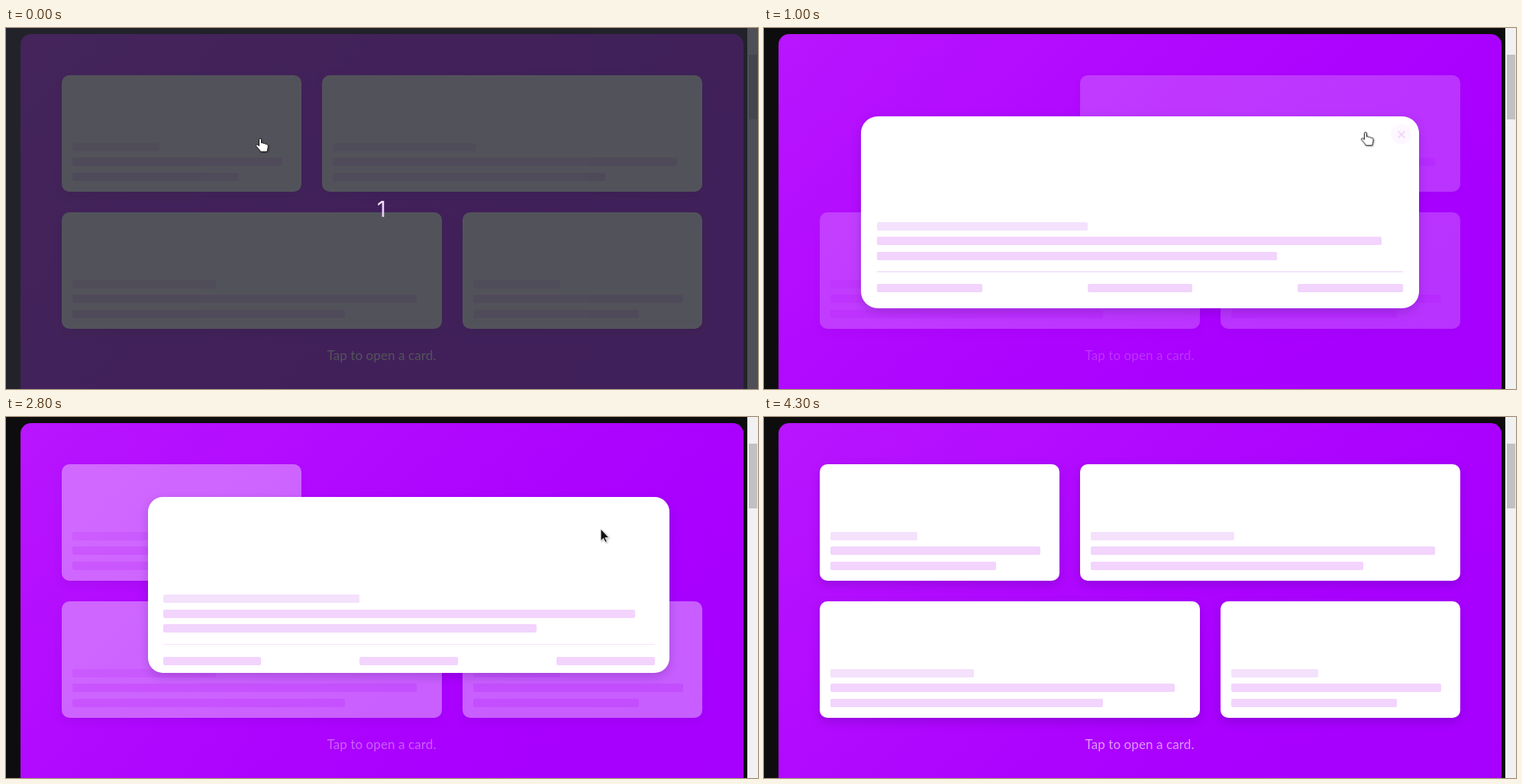
These frames come from a looping animation (985 by 474 pixels, 4500 ms). An HTML page:

```html
<!DOCTYPE html>
<html lang="en">
<head>
<meta charset="utf-8">
<title>Expanding cards</title>
<style>
  /* --p: how far a card is open; --dim-a, --dim-b: fade of the rest */
  @property --p { syntax: '<number>'; inherits: true; initial-value: 0; }
  @property --dim-a { syntax: '<number>'; inherits: true; initial-value: 0; }
  @property --dim-b { syntax: '<number>'; inherits: true; initial-value: 0; }

  html, body { margin: 0; width: 100%; height: 100%; overflow: hidden; background: #0d0d0d; }
  #stage {
    position: relative; width: 985px; height: 474px; overflow: hidden;
    animation: dim-a 4.5s linear infinite, dim-b 4.5s linear infinite;
  }
  #stage div, #stage svg { position: absolute; box-sizing: border-box; }

  .panel {
    left: 19px; top: 8px; width: 947px; height: 500px; border-radius: 14px;
    background: linear-gradient(135deg, #b915ff, #af06ff 42%, #a900ff 70%, #a600ff);
  }
  .track { left: 971px; top: 0; width: 14px; height: 474px; background: #f1f1f1; }
  .thumb { left: 2px; top: 35px; width: 11px; height: 85px; background: #c1c1c1; }

  .card {
    --rest: calc(1 - var(--p));
    left: calc(1px * (var(--x) * var(--rest) + 127 * var(--p)));
    top: calc(1px * (var(--y) * var(--rest) + 116 * var(--p)));
    width: calc(1px * (var(--w) * var(--rest) + 731 * var(--p)));
    height: calc(153px + 99px * var(--p));
    border-radius: 10px; overflow: hidden; background: #fff;
    box-shadow: 0 5px 13px rgba(40, 0, 80, .2);
    opacity: calc(1 - .8 * var(--dim-a) - .8 * var(--dim-b));
  }
  #a { --x: 73; --y: 62; --w: 314; opacity: calc(1 - .8 * var(--dim-b)); animation: open-a 4.5s infinite; }
  #b { --x: 414; --y: 62; --w: 498; opacity: calc(1 - .8 * var(--dim-a)); animation: open-b 4.5s infinite; z-index: 2; }
  #c { --x: 73; --y: 242; --w: 498; }
  #d { --x: 598; --y: 242; --w: 314; }

  .body {
    left: calc(14px + 7px * var(--p)); right: calc(14px + 7px * var(--p));
    top: calc(88.7px + 50px * var(--p)); height: 110px;
  }
  .bar { height: 11px; border-radius: 2px; background: #f2d4fd; }
  .title { width: 40%; background: #f4e1fc; }
  .line1 { width: 96%; top: 19.5px; }
  .line2 { width: 76%; top: 39px; }
  .rule {
    width: 100%; top: calc(64px + 2.5px * var(--rest));
    height: calc(.5px + 1.5px * var(--p)); background: #f4e4fc;
  }
  .tag { width: 20%; top: calc(81px + 4.5px * var(--rest)); }
  .tag:nth-of-type(6) { left: 40%; }
  .tag:nth-of-type(7) { left: 80%; }

  .close { right: 10px; top: 10px; width: 27px; height: 27px; opacity: 0; }
  #a .close { animation: close-a 4.5s linear infinite; }
  #b .close { animation: close-b 4.5s linear infinite; }

  .hint {
    left: 392px; top: 419px; width: 200px; line-height: 21px; text-align: center;
    font: 17px/21px Lato, sans-serif; letter-spacing: .1px; color: #fff;
    opacity: calc(1 - .8 * var(--dim-a) - .8 * var(--dim-b));
  }
  .hint span { animation: hint 4.5s step-end infinite; }

  .count {
    inset: 0; z-index: 5; background: rgba(39, 41, 49, .8);
    animation: count 4.5s step-end infinite;
  }
  .count div {
    left: 472px; top: 220px; width: 40px; text-align: center;
    font: 29px/35px Inter, sans-serif; color: transparent;
    background: linear-gradient(100deg, #fff 35%, #e6b4fb 65%);
    -webkit-background-clip: text; background-clip: text;
  }

  #cursor {
    left: 0; top: 0; width: 1px; height: 1px; overflow: visible; z-index: 6;
    filter: drop-shadow(1px 1px 1px rgba(0, 0, 0, .3));
    animation: move 4.5s linear infinite;
  }
  .hand { fill: #fff; stroke: #111; animation: hand 4.5s step-end infinite; }
  .arrow { fill: #111; stroke: #fff; stroke-width: .8; animation: arrow 4.5s step-end infinite; }

  @keyframes open-a {
    0%, 8.16% { --p: 0; border-radius: 10px; }
    21.49%, 39.24% { --p: 1; border-radius: 22px; }
    39.25% { border-radius: 10px; }
    52.58%, 100% { --p: 0; border-radius: 10px; }
    0%, 52.6% { z-index: 3; }
    55%, 100% { z-index: 1; }
  }
  @keyframes open-b {
    0%, 55.67% { --p: 0; border-radius: 10px; }
    69%, 80.67% { --p: 1; border-radius: 22px; }
    80.68% { border-radius: 10px; }
    94%, 100% { --p: 0; border-radius: 10px; }
  }
  @keyframes dim-a {
    0%, 10.49% { --dim-a: 0; }
    15.84%, 39.24% { --dim-a: 1; }
    43.58%, 100% { --dim-a: 0; }
  }
  @keyframes dim-b {
    0%, 58% { --dim-b: 0; }
    63.36%, 80.67% { --dim-b: 1; }
    85%, 100% { --dim-b: 0; }
  }
  @keyframes close-a {
    0%, 21.5% { opacity: 0; }
    26%, 39.24% { opacity: 1; }
    44.8%, 100% { opacity: 0; }
  }
  @keyframes close-b {
    0%, 69% { opacity: 0; }
    73.5%, 80.67% { opacity: 1; }
    86.2%, 100% { opacity: 0; }
  }
  @keyframes hint { 0% { opacity: 1; } 95.5%, 100% { opacity: .6; } }
  @keyframes count { 0% { visibility: visible; } 2.2%, 100% { visibility: hidden; } }
  @keyframes hand { 0% { opacity: 1; } 57%, 100% { opacity: 0; } }
  @keyframes arrow { 0% { opacity: 0; } 57% { opacity: 1; } 93.3%, 100% { opacity: 0; } }
  @keyframes move {
    0%, 8% { transform: translate(333px, 145px); }
    13.33% { transform: translate(558px, 137px); }
    20% { transform: translate(775px, 137px); }
    26.6% { transform: translate(813px, 136px); }
    33.3%, 39.2% { transform: translate(834px, 138px); }
    51%, 55% { transform: translate(786px, 145px); }
    62%, 69% { transform: translate(779px, 147px); }
    77.7% { transform: translate(745px, 80px); }
    82.2% { transform: translate(719px, 123px); }
    91%, 100% { transform: translate(640px, 5px); }
  }
</style>
</head>
<body>
<div id="stage">
  <div class="panel"></div>
  <div class="track"><div class="thumb"></div></div>
  <div class="card" id="a"></div>
  <div class="card" id="b"></div>
  <div class="card" id="c"></div>
  <div class="card" id="d"></div>
  <div class="hint"><span>Tap to open a card.</span></div>
  <div class="count"><div>1</div></div>
  <svg id="cursor">
    <path class="hand" d="M-1.5 9.8V1.7a1.5 1.5 0 0 1 3 0V6c1-.6 2.6-.2 3 .8 1-.5 2.3-.1 2.7.9 1.3-.5 3 .1 3 1.8V12c0 2-1.2 3.2-1.4 5.5H.5c-.6-2-2.5-3.5-5.4-7.1-1.4-2 .8-3.1 2-1.7z"/>
    <path class="arrow" d="M0 0V15.5L3.5 12.3 6 17.5 8.2 16.5 5.8 11.5H10.8Z"/>
  </svg>
</div>
<script>
  const LOOP = 4500, STEP = 100;
  const bars = ['bar title', 'bar line1', 'bar line2', 'rule', 'bar tag', 'bar tag', 'bar tag'];
  const content = `<div class="body">${bars.map(c => `<div class="${c}"></div>`).join('')}</div>
    <svg class="close" viewBox="0 0 27 27"><circle cx="13.5" cy="13.5" r="13.5" fill="#f2d4fb"/>
    <path d="M9.5 9.5l9 9m0-9l-9 9" stroke="#a808d0" stroke-width="2"/></svg>`;
  document.querySelectorAll('.card').forEach(card => card.innerHTML = content);

  // The picture advances ten times a second.
  const motions = document.getAnimations();
  motions.forEach(m => m.pause());
  const start = performance.now();
  function tick() {
    const t = Math.floor((performance.now() - start) % LOOP / STEP) * STEP;
    motions.forEach(m => m.currentTime = t);
    requestAnimationFrame(tick);
  }
  tick();
</script>
</body>
</html>
```
